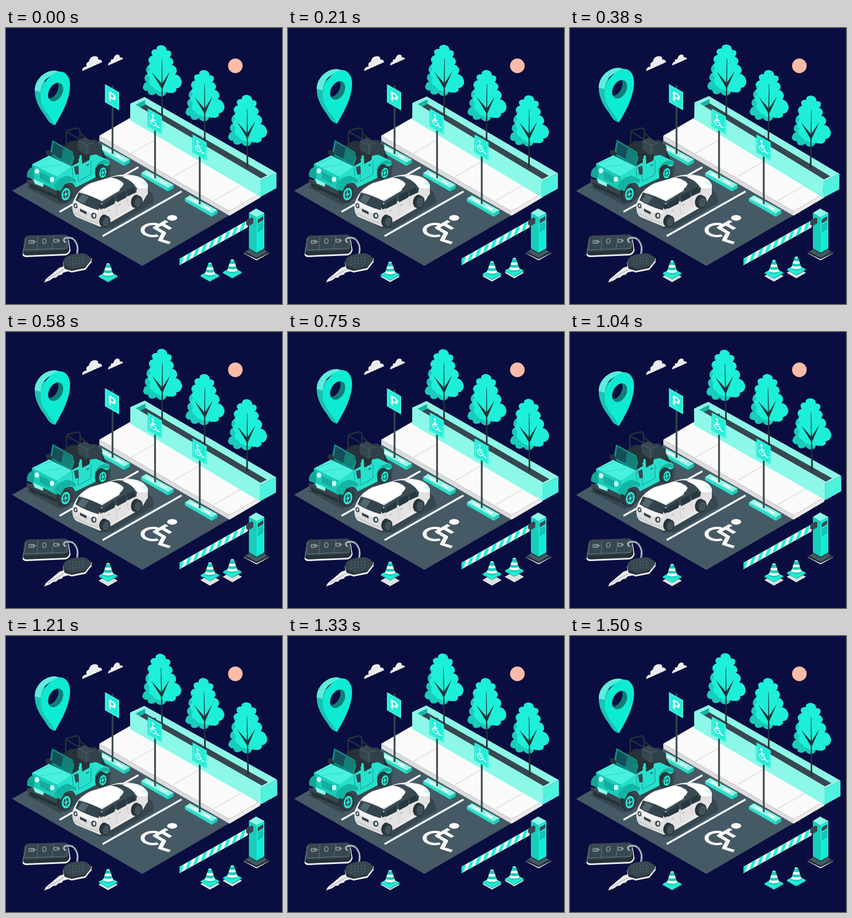
Animation of 500 by 500 pixels, one loop 1.54 s. Source, as an HTML page with a canvas:

```html
<!DOCTYPE html>
<html lang="en">
<head>
<meta charset="utf-8">
<title>Accessible parking</title>
<style>
html, body { margin: 0; width: 100%; height: 100%; overflow: hidden; background: #0a0d40; }
canvas { display: block; width: 500px; height: 500px; }
</style>
</head>
<body>
<canvas id="stage" width="500" height="500"></canvas>
<script>
const ctx = document.getElementById('stage').getContext('2d');
const LOOP = 1540, STEPS = 36, STEP_MS = 1000 / 24;
const NAVY = '#0a0d40', PALE = '#8bf8e8', BRIGHT = '#1eefd8', MID = '#18cdba', DEEP = '#0f8f84';
const SLATE = '#455a64', DARK = '#37474f', INK = '#263238', WHITE = '#fafafa', GREY = '#e0e0e0';

function fill(color, d) {
  ctx.fillStyle = color;
  ctx.fill(new Path2D(d));
}
function line(color, width, d) {
  ctx.strokeStyle = color;
  ctx.lineWidth = width;
  ctx.stroke(new Path2D(d));
}
function oval(color, x, y, rx, ry = rx, turn = 0) {
  ctx.fillStyle = color;
  ctx.beginPath();
  ctx.ellipse(x, y, rx, ry, turn, 0, Math.PI * 2);
  ctx.fill();
}
function within(matrix, draw) {
  ctx.save();
  ctx.transform(...matrix);
  draw();
  ctx.restore();
}
const at = (x, y, draw) => within([1, 0, 0, 1, x, y], draw);
function rotated(degrees, x, y, draw) {
  ctx.save();
  ctx.translate(x, y);
  ctx.rotate(degrees * Math.PI / 180);
  ctx.translate(-x, -y);
  draw();
  ctx.restore();
}

// Closed clockwise outline whose edges bulge outwards.
function scallop(color, points, bulge) {
  ctx.fillStyle = color;
  ctx.beginPath();
  ctx.moveTo(...points[0]);
  points.forEach(([x, y], i) => {
    const [nx, ny] = points[(i + 1) % points.length];
    const dx = nx - x, dy = ny - y;
    ctx.quadraticCurveTo(x + dx / 2 + dy * bulge, y + dy / 2 - dx * bulge, nx, ny);
  });
  ctx.fill();
}

function sky() {
  ctx.fillStyle = NAVY;
  ctx.fillRect(0, 0, 500, 500);
  fill('#ececec', 'M138 78Q138 70 146 70Q144 63 150 61Q152 51 161 51Q168 51 167 57Q174 57 174 62Z');
  fill('#ececec', 'M185 68Q185 62 190 61Q189 56 194 57Q197 47 203 48Q207 50 206 53Q212 53 212 56Z');
  oval('#ffbba5', 415.5, 68.5, 13.2);
}

function ground() {
  fill(SLATE, 'M11 295L171 203L405 339L247 431Z');
  fill(WHITE, 'M169 195L228 161L461 299L405 332Z');
  fill('#dcdcdc', 'M169 195L405 332V340L169 204Z');
  fill('#ececec', 'M405 332L461 299V307L405 340Z');
  line('#e6e6e6', 2.5, 'M227 227L268 204M302 270L350 242M376 313L425 285');
  line(WHITE, 3.6, 'M97 333L240 252M175 377L318 296');
  within([2.7, 1.55, -2.7, 1.55, 290.2, 316], wheelchair);
}

function wheelchair() {
  oval(WHITE, 11, 7, 2.4);
  ctx.lineJoin = 'round';
  line(WHITE, 2.1, 'M11 10.5V18.5H17L20 24L25 22.5M11 14H17');
  line(WHITE, 1.9, 'M10 15.8A5 5 0 1 0 16.5 22');
  ctx.lineJoin = 'miter';
}

function planter() {
  fill(PALE, 'M225 137L251 125L490 262L461 277V306L225 167Z');
  fill('#4ff2df', 'M461 277L490 262V290L461 306Z');
  ctx.save();
  ctx.clip(new Path2D('M234 139L252 130L481 263L462 273Z'));
  fill(DARK, 'M225 125H490V290H225Z');
  fill(PALE, 'M252 130L481 263V271L252 138Z');
  fill('#16b5a5', 'M234 139L252 130V139L234 148Z');
  ctx.restore();
  line('#b5fff4', .8, 'M234 139L252 130L481 263L462 273Z');
}

const CROWN = [[275, 33], [287, 33], [291, 41], [299, 44], [296, 53], [303, 60], [300, 67],
  [309, 75], [306, 84], [317, 93], [316, 105], [308, 109], [307, 115], [297, 117], [291, 116],
  [283, 124], [272, 118], [261, 121], [257, 114], [249, 111], [249, 104], [255, 98], [251, 90],
  [257, 83], [254, 74], [262, 66], [258, 57], [266, 50], [264, 42], [273, 39]];
const SUNLIT = [...CROWN.slice(0, 15), [283, 115], [275, 113], [266, 106], [260, 100], [262, 91],
  [257, 83], [262, 75], [259, 69], [264, 62], ...CROWN.slice(26)];

function tree() {
  scallop(MID, CROWN, .3);
  scallop(BRIGHT, SUNLIT, .3);
  fill(INK, 'M282 57H282.8L284.4 163H281.2Z');
  fill(INK, 'M281.5 109L264 80L282.5 101L297 79L284 109Z');
}

function garden() {
  planter();
  for (let i = 0; i < 3; i++) at(i * 77.3, i * 45, tree);
}

function wheelStop() {
  fill(PALE, 'M324 309L333 303L383 330L373 336Z');
  fill('#29dfcb', 'M324 309L373 336V342L324 314Z');
  fill(MID, 'M373 336L383 330V336L373 342Z');
  line(WHITE, 3.2, 'M334 309L349 317M358 322L370 329');
}

function sign(x, y, poleX, base, face) {
  line(DARK, 3.2, `M${poleX} ${y + 2}V${base}`);
  within([1, .57, 0, 1, x, y], () => {
    fill(MID, 'M-1 0H0V33H-1Z');
    fill(BRIGHT, 'M0 0H25V33H0Z');
    line('#7bf5e6', .8, 'M1.5 1.5H23.5V31.5H1.5Z');
    face();
  });
}
function letterP() {
  ctx.fillStyle = WHITE;
  ctx.font = 'bold 23px Inter, sans-serif';
  ctx.textAlign = 'center';
  ctx.fillText('P', 12.5, 25);
}
const access = () => within([.9, 0, 0, .95, -1.5, 1], wheelchair);

function wheel(x, y, rx, ry, rim) {
  oval(INK, x - 4, y - 2, rx, ry, .22);
  oval('#2e3b42', x, y, rx, ry, .22);
  oval(rim, x + .5, y, rx * .65, ry * .67, .22);
  oval(DARK, x + .5, y, rx * .43, ry * .45, .22);
  line(rim, 1.4, `M${x} ${y - ry * .5}V${y + ry * .5}M${x - rx * .45} ${y + 2}L${x + rx * .5} ${y - 2}`);
  oval(rim, x + .5, y, 2, 2.6);
}

function jeep() {
  // cabin and roll cage
  fill(INK, 'M84 228L116 205L164 202L176 224L183 240L130 266Z');
  line(INK, 2.6, 'M109 216V190Q109 186 113 185L129 181Q133 181 134 186V207M110 188L134 202M134 190L150 204');
  fill(DARK, 'M130 204L142 198L160 207V224L145 230L130 220Z');
  fill('#31414a', 'M151 207L159 203L174 213V232L160 237L151 228Z');
  line('#536871', 1, 'M131 204L146 212L160 207M146 212V228');
  // side
  fill('#27e0cc', 'M92 268L120 250L132 243L131 232L137 230L138 246L151 239L152 231L163 229L187 240L188 247L180 251Q166 249 162 271L126 289Q119 270 98 291H92Z');
  fill('#14b3a3', 'M160 257Q166 239 180 239L188 242V247Q173 243 164 258Z');
  line(DEEP, .9, 'M131 252V278L154 265V240M120 253L122 282');
  line(INK, 1.4, 'M146 249L150 247');
  // windscreen
  fill(DEEP, 'M84 203L126 227L119 252L79 230Z');
  fill('#154f5a', 'M86 207L122 228L116 246L83 228Z');
  fill('#148078', 'M104 218L122 228L116 246L100 238Z');
  fill(INK, 'M121 224L128 222L133 228V237L123 233Z');
  fill(INK, 'M72 222L79 221L84 228L82 235L73 230Z');
  fill(DARK, 'M123 252L131 249L132 264L126 266Z');
  // bonnet and front
  fill('#4af0de', 'M47 247L78 231L119 251L95 267Q92 270 88 268Z');
  line('#25d9c5', .9, 'M54 246L84 234M61 253L101 247');
  fill(MID, 'M47 247L92 269V295L48 273Z');
  fill('#14a596', 'M38 264Q40 253 51 251V275L38 270Z');
  for (let i = 0; i < 6; i++) line(DEEP, 1.5, `M${63 + i * 3} ${261 + i * 1.5}v13`);
  oval('#d8fff9', 56, 259.5, 4, 4.8);
  oval('#d8fff9', 83.5, 274.5, 4, 4.8);
  fill(INK, 'M42 278L58 287L57 293Q47 294 42 286Z');
  fill(DARK, 'M38 273L91 299V308L42 286L38 281Z');
  fill(INK, 'M42 281L91 303V309L42 287Z');
  fill(PALE, 'M49 273L68 282L67 288L52 282Z');
  wheel(175, 262, 9.5, 14, BRIGHT);
  wheel(108, 301, 12, 17, BRIGHT);
  fill('#14b3a3', 'M87 284Q95 269 112 267L126 273L127 281Q118 274 105 285L99 296L88 291Z');
  line(BRIGHT, .8, 'M88 283Q97 270 112 267L126 273');
}

function car() {
  fill(DARK, 'M117 331L170 364L190 363L267 317Q271 304 256 291Z');
  fill('#e9e9e9', 'M121 316L127 303Q136 289 153 281L190 270Q208 263 232 267Q252 271 257 284V299L245 320L191 351L170 360L127 342Q118 335 121 316Z');
  // side, roof and glass
  fill('#e3e1e1', 'M169 331L180 319L239 287L257 286V301L191 348L170 360Z');
  fill('#3a4b54', 'M187 272Q205 265 222 272L238 287L236 298L178 323L172 315L207 294Z');
  fill('#ffffff', 'M136 295Q146 283 188 271Q205 272 213 282Q211 293 178 308L170 311Z');
  fill('#ffffff', 'M211 270Q238 264 250 276Q257 281 257 289Q242 292 236 289Q230 277 211 270Z');
  fill('#c4fff5', 'M243 279Q251 278 255 284L254 288Q248 283 243 279Z');
  fill('#33444d', 'M132 298Q153 303 174 314L168 330Q146 325 126 312Z');
  fill('#526770', 'M137 301L150 306L141 319L130 312Z');
  fill('#263840', 'M178 318L197 305V318L177 328ZM201 303L216 295L218 307L201 316ZM219 294L231 288L235 296L221 305Z');
  line('#bfc3c5', .8, 'M176 329L173 355M199 317L201 338M219 307L222 322');
  line('#9ba4a8', 1.2, 'M203 322L208 319M184 332L188 330');
  // front
  fill('#f2f2f2', 'M124 313Q148 324 168 331L165 339Q140 333 122 319Z');
  fill('#dcdcdc', 'M121 319Q140 334 168 337L170 360L127 342Q119 333 121 319Z');
  oval(DARK, 126, 322, 3.4, 4.6, -.25);
  oval('#e8e8e8', 126, 322, 1.5, 2.2);
  oval(DARK, 159, 340, 4.8, 5.6, -.15);
  oval('#e8e8e8', 159.5, 340, 2.2, 2.9);
  fill(DARK, 'M134 327L146 333V338L134 332Z');
  line('#b4b9bc', 1.2, 'M124 335L147 347L168 354');
  fill(INK, 'M168 320L176 319L178 326L171 329Z');
  wheel(181, 351, 8, 11, '#4a5a62');
  wheel(239, 316, 8.5, 12, '#4a5a62');
}

function keys() {
  fill('#eeeeee', 'M34 380L30 411Q31 415 37 415L108 412Q115 410 117 403L113 379Z');
  fill(INK, 'M34 379L31 408Q32 412 38 412L108 409Q114 407 115 401L112 379Z');
  fill(DARK, 'M40 376L107 374Q113 375 113 381L112 396Q111 401 104 402L36 405Q31 404 32 398L35 380Q36 377 40 376Z');
  line('#617780', 1, 'M36 380L33 402L110 399L113 380M58 377L56 403M87 376L83 401');
  line('#cdd5d8', .9, 'M42 385H51V390H42ZM45 387H55M67 383L70 381L73 384L72 389L68 391L66 388ZM87 383H95V388H87ZM92 385H98');
  line('#9aa7ad', 2.6, 'M108 389Q101 383 108 380Q123 376 129 393Q132 402 128 413');
  line('#eceff1', .9, 'M107 388Q102 384 109 381Q122 378 128 393Q130 401 127 412');
  fill('#eeeeee', 'M110 430L97 434L72 455L69 461L80 457L85 453L91 452L95 448L101 447L104 443L113 441Z');
  line('#9ca8ad', 1.1, 'M76 455L107 436');
  fill('#eeeeee', 'M103 424L105 438L119 443L144 438L155 424V417Z');
  fill(INK, 'M103 421L106 436L119 440L143 435L154 421V415Z');
  fill(DARK, 'M105 419Q109 412 124 409L141 408Q151 412 154 418Q151 430 138 433L121 437L108 431Q103 425 105 419Z');
  for (let i = 0; i < 15; i++) oval('#65777f', 115 + i % 5 * 6, 418 + Math.floor(i / 5) * 5 - i % 5 * .6, 1.2, .8);
}

function barrier() {
  fill('#eeeeee', 'M430 408L452 396L477 408L454 421Z');
  fill(INK, 'M431 406L453 394L476 406V408L454 419L431 408Z');
  fill(SLATE, 'M434 405L453 395L473 405L454 416Z');
  fill(MID, 'M440 335L454 343V411L440 403Z');
  fill('#12ecd4', 'M454 343L468 335V403L454 411Z');
  fill(PALE, 'M440 335L453 327L468 335L454 343Z');
  fill(DARK, 'M440 399L454 407L468 399V403L454 411L440 403Z');
  fill(DARK, 'M456 347L466 341V348L456 354Z');
  for (let i = 0; i < 4; i++) line(DEEP, 1.3, `M456 ${358 + i * 3.5}l10 -6`);
  ctx.save();
  ctx.clip(new Path2D('M314 418L438 348V361L314 430Z'));
  fill(WHITE, 'M310 340H440V432H310Z');
  for (let x = 310; x < 440; x += 14) {
    const y = 418 - (x - 314) * .565;
    fill(BRIGHT, `M${x + 6} ${y - 4}l7 -4l-7 21l-7 4Z`);
  }
  ctx.restore();
  fill(MID, 'M314 418L316 417V429L314 430Z');
  fill(DARK, 'M435 348L446 343L448 346V354L439 359L435 356Z');
}

function cone(x, y, lift) {
  at(x, y, () => {
    fill(GREY, 'M-17.5 0L0 -10L17.5 0L0 10Z');
    at(0, lift, () => {
      fill(MID, 'M-17 -1.5L0 8V10L-17 .5Z');
      fill('#12b7a7', 'M17 -1.5L0 8V10L17 .5Z');
      fill(BRIGHT, 'M-17 -1.5L0 -11L17 -1.5L0 8Z');
      ctx.save();
      ctx.clip(new Path2D('M-3 -23Q0 -25 3 -23L10 -2Q0 5 -10 -2Z'));
      fill(MID, 'M-12 -25H12V5H-12Z');
      line(WHITE, 4.5, 'M-12 -16Q0 -11 12 -16M-12 -7Q0 -1 12 -7');
      ctx.restore();
      oval(PALE, 0, -23, 3, 1.4);
    });
  });
}

function pin() {
  fill('#19c3b1', 'M89 176C78 174 75 165 70 158C60 145 52 130 52 113L66 100L98 79L90 140Z');
  fill('#5ceddb', 'M52 113C52 95 68 77 89 77L101 80Q64 87 63 116Z');
  fill('#0eebd3', 'M89 176C80 158 64 147 63 127C62 103 80 81 98 79C110 79 117 92 116 106C115 133 98 160 89 176Z');
  oval('#0e7f76', 90, 116, 12, 18, .5);
  ctx.save();
  ctx.beginPath();
  ctx.ellipse(90, 116, 12, 18, .5, 0, Math.PI * 2);
  ctx.clip();
  oval(NAVY, 81.5, 111, 12, 18, .5);
  ctx.restore();
}

function render(time) {
  // The scene advances at 24 steps a second, resting one extra step at the end.
  const step = Math.min(STEPS, Math.floor((time % LOOP + 5) / STEP_MS));
  const phase = step / STEPS;
  const lift = -10 * (1 - Math.abs(1 - 2 * phase));
  const sway = phase < .25 ? 4 * phase : phase < .75 ? 2 - 4 * phase : 4 * phase - 4;
  sky();
  ground();
  rotated(sway, 357, 166, garden);
  for (let i = 0; i < 3; i++) at(-79.3 * i, -46 * i, wheelStop);
  sign(180, 102, 193, 228, letterP);
  sign(257.5, 146, 270, 272, access);
  sign(338.5, 193, 351, 319, access);
  fill(DARK, 'M36 288L98 321L188 271L190 246Z');
  rotated(sway, 113, 250, jeep);
  car();
  keys();
  barrier();
  cone(185, 450.5, lift);
  cone(410, 443.5, lift);
  cone(369.5, 449.5, lift);
  at(0, lift, pin);
}

const start = performance.now();
function tick() {
  render(performance.now() - start);
  requestAnimationFrame(tick);
}
tick();
</script>
</body>
</html>
```
